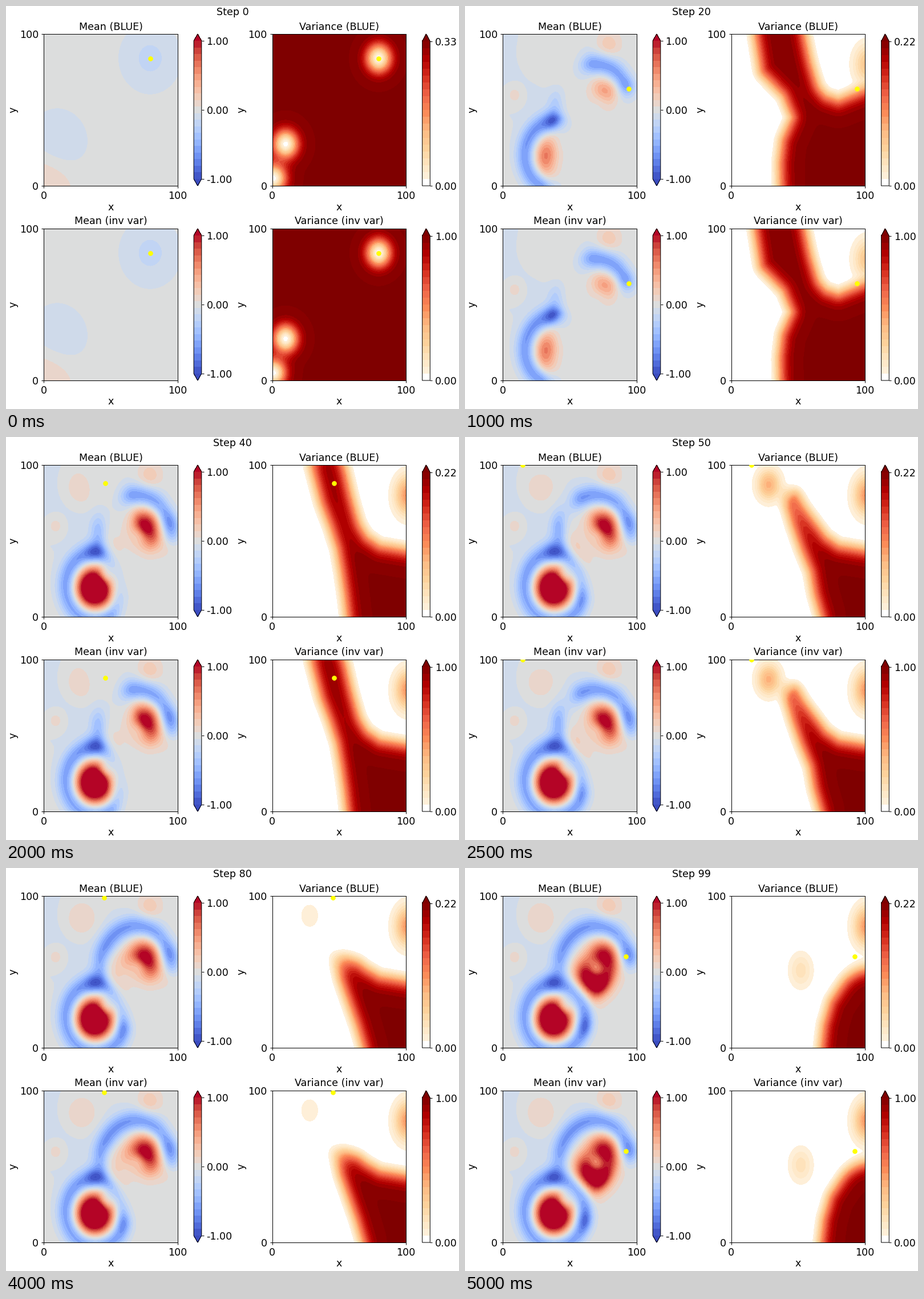
A matplotlib script for the animation above (5500 ms loop, 794 by 706 pixels).

```python
import numpy as np
import matplotlib.pyplot as plt
from matplotlib.animation import FuncAnimation
from matplotlib.colors import ListedColormap

W, H, DPI = 794, 706, 100
PT = 0.9  # line and font scale
BANDS = 21

plt.rcParams.update({
    "font.family": "DejaVu Sans", "font.size": 14 * PT,
    "axes.titlesize": 14 * PT, "axes.titlepad": 6 * PT,
    "axes.linewidth": 0.8 * PT,
    "xtick.labelsize": 14 * PT, "ytick.labelsize": 14 * PT,
    "xtick.major.size": 3.5 * PT, "ytick.major.size": 3.5 * PT,
    "xtick.major.pad": 3.5 * PT, "ytick.major.pad": 3.5 * PT,
    "xtick.major.width": 0.8 * PT, "ytick.major.width": 0.8 * PT,
})

STEPS = [*range(0, 100, 10), 99]
SENSOR = [(79.5, 84), (92, 98), (94, 64), (71, 69), (46, 88), (15, 100),
          (50, 72), (34.5, 99), (45.2, 99), (62, 44), (92, 60)]
SEEDS = [(79.5, 84, -.17), (10, 27.5, -.17), (1, 5, .17)]

# Edges of the unexplored area at a few steps; blended in between
KEYS = [10, 30, 50, 80, 99]
LEFT_Y = [0, 15, 30, 45, 60, 75, 100]
LEFT_X = np.array([[29, 27, 33, 47, 38, 13, 15],
                   [46, 47, 45, 46, 41, 33, 22],
                   [68, 63, 60, 53, 47, 42, 38],
                   [69, 64, 58, 52, 48, 46, 46],
                   [68, 70, 75, 86, 100, 110, 120]])
TOP_X = [48, 53, 58, 64, 70, 80, 100]
TOP_Y = np.array([[140, 82, 72, 67, 65, 65, 82],
                  [140, 125, 92, 62, 52, 46, 43],
                  [80, 72, 66, 59, 52, 46, 43],
                  [58, 58, 57, 55, 51, 46, 43],
                  [58, 58, 58, 56, 54, 52, 52]])

axis = np.linspace(0, 100, 71)
X, Y = np.meshgrid(axis, axis)


def blob(x, y, sx, sy=None):
    return np.exp(-((X - x) / sx) ** 2 / 2 - ((Y - y) / (sy or sx)) ** 2 / 2)


def rim(x, y, radius, width):
    return np.exp(-((np.hypot(X - x, Y - y) - radius) / width) ** 2 / 2)


def truth(growth):
    """Two peaks with negative rims on a weak background."""
    first = 1.9 * blob(38, 19, 9) - .5 * blob(46, 27, 4)
    second = (1.2 * blob(75, 59, 8) + .9 * blob(61, 49, 7)
              + .95 * blob(70, 42, 7.5) + .5 * blob(80, 42, 8)
              - .9 * blob(70, 52, 5))
    rims = (.66 * rim(39, 20, 22, 5) + .35 * blob(38, 43, 5)
            + .35 * blob(63, 14, 5) + .2 * blob(93, 62, 5)
            + .62 * rim(69, 54, 26, 5) / (1 + np.exp((50 - Y) / 4)))
    weak = (.22 * blob(28, 85, 9) + .22 * blob(79, 93, 6)
            + .15 * blob(9, 60, 5) + .1 * blob(94, 34, 9)
            - .09 * blob(20, 75, 30))
    return growth * (first + second) - rims + weak


def blend(step, table):
    return np.array([np.interp(step, KEYS, col) for col in table.T])


def signed_dist(u, v, ku, kv):
    """Distance to the smoothed curve v(u), positive above it."""
    t = np.linspace(-25, 125, 601)
    win = np.hanning(27)
    c = np.convolve(np.pad(np.interp(t, ku, kv), 13, mode="edge"),
                    win / win.sum(), mode="valid")
    d2 = (u[..., None] - t) ** 2 + (v[..., None] - c) ** 2
    return np.sign(v - np.interp(u, t, c)) * np.sqrt(d2.min(axis=-1))


def rise(d, reach):
    return 1 - np.exp(-(np.maximum(d, 0) / reach) ** 2)


def estimate(step):
    """Mean and the two relative variances after a step."""
    if step == 0:
        mean = sum(a * blob(x, y, 15) for x, y, a in SEEDS)
        return mean, [np.prod([rise(np.hypot(X - x, Y - y), r)
                               for x, y, _ in SEEDS], axis=0)
                      for r in (9.3, 9.1)]
    left = signed_dist(Y, X, LEFT_Y, blend(step, LEFT_X)) + 9.5
    top = 9.5 - signed_dist(X, Y, TOP_X, blend(step, TOP_Y))
    # Gaps the sensors passed by
    gaps = (1 - np.interp(step, [40, 50, 70, 99], [0, .4, .12, 0])
            * blob(28, 87, 6, 7))
    gaps *= 1 - np.interp(step, [10, 30, 40], [0, .65, .5]) * blob(102, 80, 7, 9)
    gaps *= 1 - np.interp(step, [80, 99], [0, .17]) * blob(52, 51, 6, 8)
    both = [1 - (1 - rise(left, r) * rise(top, r)) * gaps for r in (11.4, 11)]
    growth = np.interp(step, [10, 30], [0, 1])
    return truth(growth) * (1 - both[0]) ** 1.2, both


reds = plt.get_cmap("OrRd")((np.arange(BANDS) + 0.5) / BANDS)
reds[0] = 1
HEAT = ListedColormap(reds)
HEAT.set_over(plt.get_cmap("OrRd")(1.0))
MEAN = dict(levels=np.linspace(-1, 1, BANDS + 1), cmap="coolwarm",
            vmin=-1, vmax=1, extend="both")
VAR = dict(levels=np.linspace(0, 1, BANDS + 1), cmap=HEAT,
           vmin=0, vmax=1, extend="max")

fig = plt.figure(figsize=(W / DPI, H / DPI), dpi=DPI, facecolor="white")


def box(x0, y0, x1, y1):
    return fig.add_axes([x0 / W, 1 - y1 / H, (x1 - x0) / W, (y1 - y0) / H])


def label(x, y, s, **kw):
    return fig.text(x / W, 1 - y / H, s, ha="center", va="center", **kw)


class Panel:
    def __init__(self, x, y, title, style, ticks):
        self.style = style
        self.ax = box(x, y, x + 234.7, y + 266)
        self.ax.set(xlim=(0, 100), ylim=(0, 100), xticks=[0, 100],
                    yticks=[0, 100], title=title)
        label(x + 117.5, y + 303.5, "x")
        label(x - 54, y + 132.5, "y", rotation=90)
        self.dot, = self.ax.plot([], [], "o", color="yellow", ms=6.2,
                                 mew=0, zorder=5)
        self.cs = self.ax.contourf(X, Y, X * 0, **style)
        cax = box(x + 263, y, x + 276.7, y + 266)
        self.bar = fig.colorbar(self.cs, cax=cax)
        self.bar.outline.set_linewidth(0.8 * PT)
        self.bar.set_ticks(ticks, labels=[f"{t:.2f}" for t in ticks])
        self.bar.ax.minorticks_off()

    def show(self, z, spot):
        self.cs.remove()
        self.cs = self.ax.contourf(X, Y, z, **self.style)
        self.dot.set_data([spot[0]], [spot[1]])


rows = []
for y0, name in ((49, "BLUE"), (390, "inv var")):
    rows.append((Panel(66.1, y0, f"Mean ({name})", MEAN, [-1, 0, 1]),
                 Panel(466.6, y0, f"Variance ({name})", VAR, [0, 1])))
heading = label(397, 11.5, "")
fields = [estimate(s) for s in STEPS]


def update(i):
    heading.set_text(f"Step {STEPS[i]}")
    mean, variances = fields[i]
    for (left, right), var in zip(rows, variances):
        left.show(mean, SENSOR[i])
        right.show(var / 0.997, SENSOR[i])
    peak = "0.33" if i == 0 else "0.22"
    rows[0][1].bar.set_ticks([0, 1], labels=["0.00", peak])
    return []


anim = FuncAnimation(fig, update, frames=len(STEPS), interval=500,
                     init_func=lambda: [], repeat=True, repeat_delay=0,
                     blit=False)
plt.show()
```
